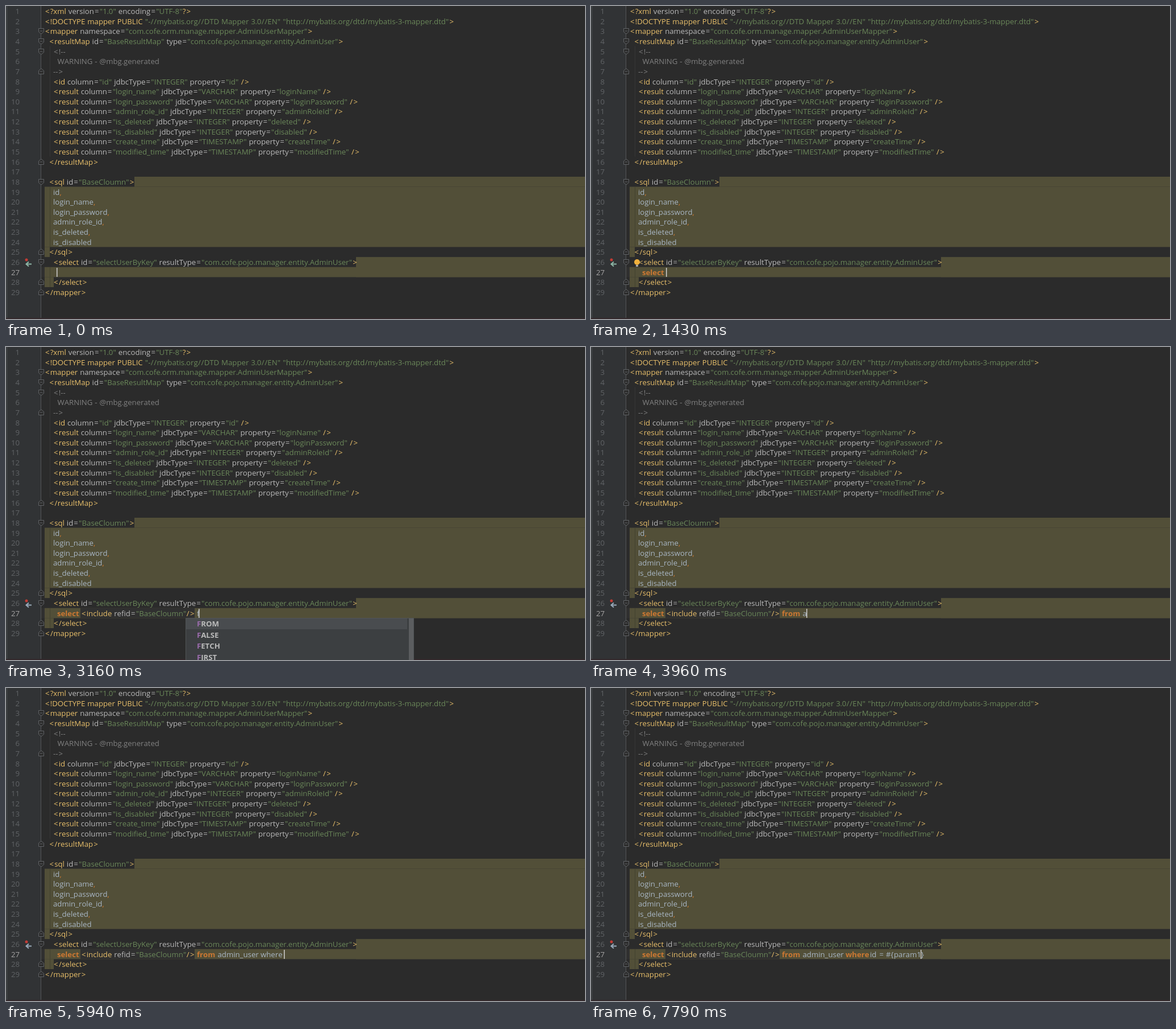
An HTML page with a canvas for the animation above (8000 ms loop, 1019 px wide and 550 px high).

```html
<!DOCTYPE html>
<html lang="en">
<head>
<meta charset="utf-8">
<title>Mapper editor</title>
<style>
html, body { margin: 0; width: 100%; height: 100%; overflow: hidden; background: #2b2b2b; }
canvas { display: block; }
</style>
</head>
<body>
<canvas id="stage" width="1019" height="550"></canvas>
<script>
const ctx = document.getElementById('stage').getContext('2d');
const W = 1019, H = 550, ROW = 17.64, LOOP = 8000;
const FONT = '13.2px "Open Sans", "Noto Sans", sans-serif';
const C = {
  bg: '#2b2b2b', gutter: '#313335', number: '#606366', olive: '#524f38', caretRow: '#303030',
  tag: '#e8bf6a', attr: '#bababa', string: '#6a8759', comment: '#808080',
  plain: '#a9b7c6', keyword: '#cc7832', match: '#ffef28', fold: '#606366'
};
// Cell widths of the punctuation
const CELL = { '<': 9.7, '>': 9.7, '=': 9.7, '/': 5.5, '"': 5.6, '.': 3.1, ' ': 3.9 };

const result = (col, type, prop) =>
  `    <result column="${col}" jdbcType="${type}" property="${prop}" />`;
const LINES = [
  '<?xml version="1.0" encoding="UTF-8"?>',
  '<!DOCTYPE mapper PUBLIC "-//mybatis.org//DTD Mapper 3.0//EN" "http://mybatis.org/dtd/mybatis-3-mapper.dtd">',
  '<mapper namespace="com.cofe.orm.manage.mapper.AdminUserMapper">',
  '  <resultMap id="BaseResultMap" type="com.cofe.pojo.manager.entity.AdminUser">',
  '    <!--',
  '      WARNING - @mbg.generated',
  '    -->',
  '    <id column="id" jdbcType="INTEGER" property="id" />',
  result('login_name', 'VARCHAR', 'loginName'),
  result('login_password', 'VARCHAR', 'loginPassword'),
  result('admin_role_id', 'INTEGER', 'adminRoleId'),
  result('is_deleted', 'INTEGER', 'deleted'),
  result('is_disabled', 'INTEGER', 'disabled'),
  result('create_time', 'TIMESTAMP', 'createTime'),
  result('modified_time', 'TIMESTAMP', 'modifiedTime'),
  '  </resultMap>',
  '',
  '  <sql id="BaseCloumn">',
  '    id,', '    login_name,', '    login_password,', '    admin_role_id,', '    is_deleted,', '    is_disabled',
  '  </sql>',
  '    <select id="selectUserByKey" resultType="com.cofe.pojo.manager.entity.AdminUser">',
  '',
  '    </select>',
  '</mapper>'
];

// Statement being typed: x, text, time at which it is recognised
const PARTS = [
  [90, 'select ', 1030], [132, '<include refid="BaseCloumn"/> ', 2530], [336, 'from ', 3850],
  [372.5, 'admin_user '], [448, 'where ', 6410], [491, 'id = '], [519, '#'], [527.5, '{'], [533, 'param1']
];
const STATEMENT = PARTS.map(p => p[1]).join('');

// Completion lists: x, width, items
const POPUPS = {
  select: [80, 402, 'SELECT SET SHOW START'],
  include: [130, 402, 'include if'],
  refid: [214, 401, 'BaseCloumn'],
  from: [316, 402, 'FROM FALSE FETCH FIRST'],
  table: [363, 402, 'admin_user ALL AND ANY'],
  where: [437, 403, 'WHERE WITH WHEN WINDOW'],
  column: [482, 453, 'id is_deleted is_disabled IN'],
  param: [513, 401, 'param1']
};

// Time, typed characters, completion list, text after the caret
const STEPS = [
  [0, 0], [100, 1], [160, 1, 'select'], [220, 2, 'select'], [270, 3, 'select'], [330, 5, 'select'],
  [390, 6, 'select'], [790, 7], [1490, 8], [1660, 9, 'include'], [1720, 10, 'include'],
  [1940, 23, 'refid', '"'], [2290, 34], [2470, 35], [2530, 36], [2760, 37],
  [2990, 38], [3050, 38, 'from'], [3220, 39, 'from'], [3280, 40, 'from'], [3450, 41, 'from'], [3500, 42],
  [3910, 43], [3970, 43, 'table'], [4090, 44, 'table'], [4150, 45, 'table'], [4250, 46, 'table'], [4310, 47],
  [4540, 48], [4770, 49], [4890, 50], [5000, 51], [5060, 52], [5120, 53],
  [5300, 54], [5360, 54, 'where'], [5480, 55, 'where'], [5540, 56, 'where'], [5600, 57, 'where'], [5700, 58, 'where'],
  [5940, 59], [6000, 60, 'column'], [6290, 61, 'column'], [6410, 62], [6580, 63], [6760, 64],
  [6930, 65], [7050, 66, '', '}'], [7390, 66, 'param', '}'], [7620, 72, '', '}']
];
const BULBS = [[1430, 1490], [3850, 3910], [7680, 7790]];

const rowTop = n => (n - 1) * ROW + 0.1;
const baseline = n => Math.round(n * ROW - 3.6);
const during = (t, [a, b]) => t >= a && t < b;

function box(x, y, w, h, color) {
  ctx.fillStyle = color;
  ctx.fillRect(x, y, w, h);
}

function path(points, color, width = 1, fill) {
  ctx.beginPath();
  points.forEach(([x, y]) => ctx.lineTo(x, y));
  if (fill) { ctx.closePath(); ctx.fillStyle = fill; ctx.fill(); }
  ctx.strokeStyle = color;
  ctx.lineWidth = width;
  ctx.stroke();
}

function dot(x, y, r, color) {
  ctx.beginPath();
  ctx.arc(x, y, r, 0, 7);
  ctx.fillStyle = color;
  ctx.fill();
}

// Draws text and returns the x where it ends
function put(text, x, y, color, bold) {
  ctx.font = (bold ? 'bold ' : '') + FONT;
  ctx.fontKerning = 'none';
  ctx.fillStyle = color;
  for (const piece of text.match(/[<>=\/". ]|[^<>=\/". ]+/g) || []) {
    const own = ctx.measureText(piece).width, w = CELL[piece] || own;
    ctx.fillText(piece, x + (w - own) / 2, y);
    x += w;
  }
  return x;
}

function putXml(text, x, y) {
  const tokens = text.match(/<!DOCTYPE mapper PUBLIC|"[^"]*"?|<[?\/]?\w*|[?\/]?>|\/|[^"<>\/?]+/g) || [];
  for (const s of tokens) {
    const color = s[0] === '"' ? C.string : /[<>\/]/.test(s) ? C.tag : C.attr;
    x = put(s, x, y, color);
  }
  return x;
}

function drawLine(text, n) {
  const body = text.trimStart(), y = baseline(n);
  const x = 68 + (text.length - body.length) * 3.75;
  if (n >= 5 && n <= 7) put(body, x, y, C.comment);
  else if (n >= 19 && n <= 24) {
    const end = put(body.replace(',', ''), x, y, C.plain);
    if (body.endsWith(',')) put(',', end, y, C.keyword);
  } else putXml(body, x, y);
}

function drawFold(n, dir) {
  const y = Math.round(rowTop(n)) + 9;
  path([[57.5, y - 4.5 * dir], [66.5, y - 4.5 * dir], [66.5, y + 1.5 * dir], [62, y + 5 * dir],
    [57.5, y + 1.5 * dir], [57.5, y - 4.5 * dir]], C.fold, 1, C.bg);
  path([[59.5, y], [64.5, y]], C.fold);
}

function drawBackground(t) {
  box(0, 0, W, H, C.bg);
  box(0, 0, 62, H, C.gutter);
  box(0, 0, 3, H, '#3a3d3f');
  box(61, 0, 1, H, '#555657');
  box(0, 548, W, 2, '#33282b');
  box(77, rowTop(5), 1, rowTop(16) - rowTop(5), '#373737');

  const rows = (n, x, end = W, count = 1, color = C.olive) => box(x, rowTop(n), end - x, count * ROW, color);
  rows(18, 226);
  rows(19, 68, W, 6);
  rows(25, 68, 77);
  rows(19, 77, 78, 6, '#43412f');

  rows(27, 62, W, 1, C.caretRow);
  if (during(t, [2530, 2700])) return;
  rows(26, 616, W, 2);
  rows(27, 68);
  rows(28, 68, 84);
  rows(27, 77, 78, 2, '#43412f');
  if (t >= 2700) rows(27, 131, 332, 1, C.caretRow);
}

function drawGutter(t) {
  ctx.textAlign = 'right';
  ctx.font = FONT;
  LINES.forEach((_, i) => {
    ctx.fillStyle = i === 26 ? '#a4a3a3' : C.number;
    ctx.fillText(i + 1, 24, baseline(i + 1));
  });
  ctx.textAlign = 'left';
  [3, 4, 5, 18, 26].forEach(n => drawFold(n, 1));
  [7, 16, 25, 28, 29].forEach(n => drawFold(n, -1));

  dot(36, 446, 2.5, '#c23b35');
  const arrow = t < 2590 ? '#8fb8a8' : '#9aabbb';
  path([[45, 453.5], [36, 453.5]], arrow, 2);
  path([[40, 449.5], [35.5, 453.5], [40, 457.5]], arrow, 2);
}

function drawStatement(t, count, tail) {
  const y = baseline(27);
  let x = 90, left = count;
  for (const [start, text, known] of PARTS) {
    if (left <= 0) break;
    const shown = text.slice(0, left);
    left -= text.length;
    const live = t >= known;
    if (text[0] === '<' && live) x = putXml(shown, start, y);
    else if (text[0] === '<' && shown.includes('"')) {
      x = start;
      for (const s of shown.match(/"|[^"]+/g)) {
        const quote = s === '"' && t < 2470;
        if (quote) box(x, 460, CELL[s], 16, '#3b514d');
        x = put(s, x, y, quote ? C.match : C.plain, quote);
      }
    } else x = put(shown, start, y, live ? C.keyword : C.plain, live);
  }
  if (tail) put(tail, x, y, C.plain);
  box(Math.round(x) - 1, 460, 1.5, 16, '#d0d0d0');
}

function drawPopup(name, typed) {
  const [x, w, list] = POPUPS[name];
  const prefix = typed.match(/\w*$/)[0].toLowerCase();
  const items = list.split(' ').filter(s => s.toLowerCase().startsWith(prefix));
  const h = items.length > 1 ? 74 : 36;
  box(x, 476, w, h, '#3c3f41');
  box(x + 1, 477, w - (h > 36 ? 13 : 2), 19, '#494c4f');
  if (h > 36) box(x + w - 9, 477, 8, h, '#5b5d5f');
  path([[x + 0.5, 476 + h], [x + 0.5, 476.5], [x + w - 0.5, 476.5], [x + w - 0.5, 476 + h]], '#515456');
  items.forEach((s, i) => {
    const y = Math.round(491.3 + i * 19.4), cut = prefix.length;
    const end = put(s.slice(0, cut), x + 20, y, '#9c6cae', true);
    put(s.slice(cut), end, y, '#bbbbbb', true);
  });
}

function drawBulb() {
  dot(81, 450, 5, '#f0b03c');
  box(79, 455, 4, 3, '#a8a8a8');
}

function draw(now) {
  const t = now % LOOP;
  const [, count, popup, tail] = STEPS.findLast(s => s[0] <= t);
  drawBackground(t);
  drawGutter(t);
  LINES.forEach((text, i) => drawLine(text, i + 1));
  drawStatement(t, count, tail);
  if (BULBS.some(b => during(t, b))) drawBulb();
  if (popup) drawPopup(popup, STATEMENT.slice(0, count));
}

const begin = performance.now();
function tick() {
  draw(performance.now() - begin);
  requestAnimationFrame(tick);
}
tick();
</script>
</body>
</html>
```
